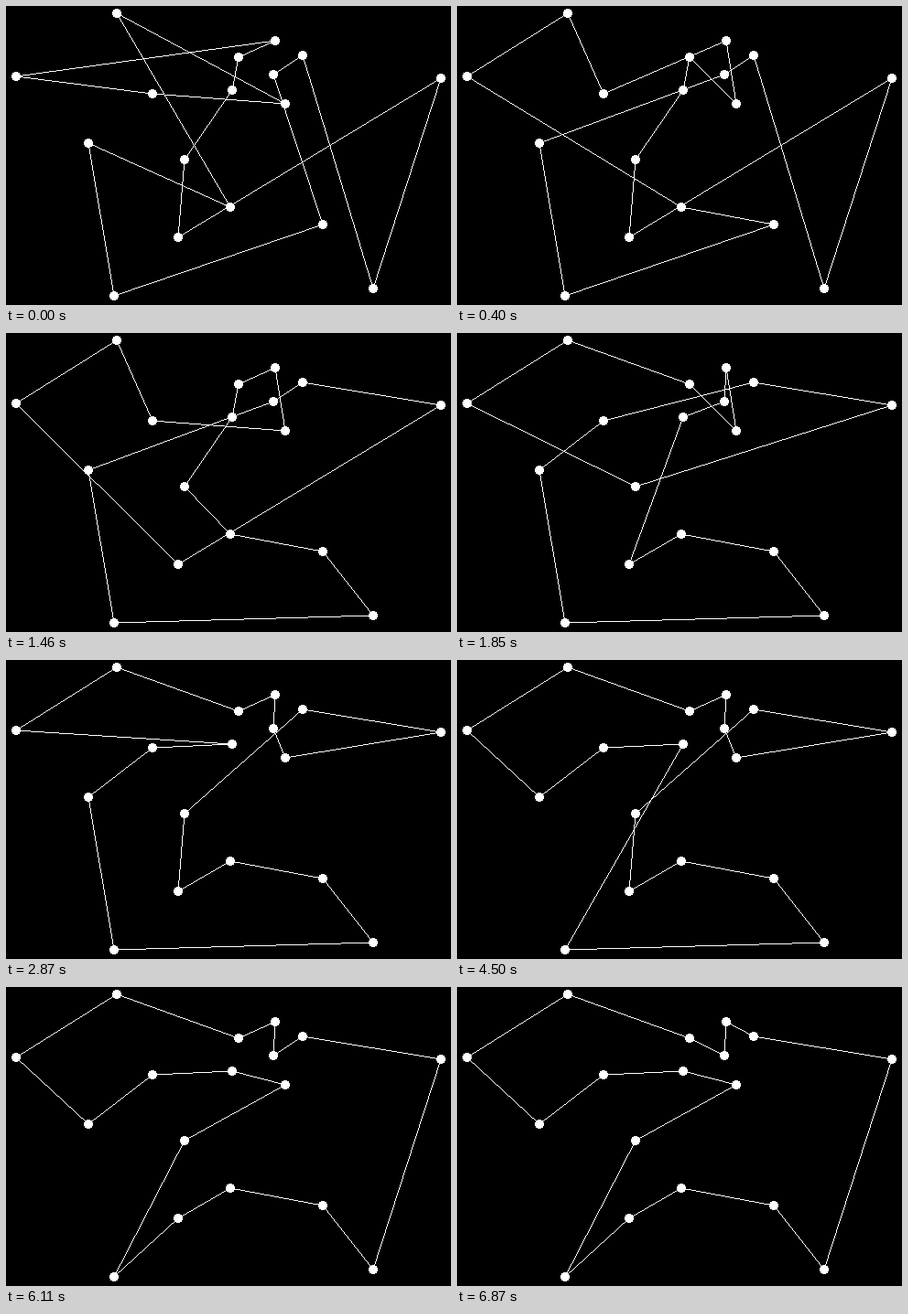
A matplotlib script that plays this animation: 486x327 px, repeating every 8 s.

```python
import matplotlib.pyplot as plt
import numpy as np
from matplotlib.animation import FuncAnimation

W, H, DPI = 486, 327, 64
LOOP, STEP = 8000, 20
DOT_RADIUS = 5

CITIES = {
    "A": (121, 8), "B": (11, 77), "C": (160, 96), "D": (254, 56),
    "E": (294, 38), "F": (324, 54), "G": (292, 75), "H": (305, 107),
    "I": (247, 92), "J": (475, 79), "K": (90, 150), "L": (195, 168),
    "M": (245, 220), "N": (188, 253), "O": (346, 239), "P": (118, 317),
    "Q": (401, 309),
}
START = "ILNJQFGOPKMAHCBED"

# "XY" swaps two cities, "X-Y" reverses the stretch between them.
MOVES = [
    (130, "HE KO"), (260, "EB"), (400, "AB"), (770, "F-P"), (1050, "JO"),
    (1190, "EH"), (1460, "MN"), (1720, "CG"), (1850, "GD LN"),
    (2380, "LI"), (2500, "HE"), (2750, "F-G G-I"), (2870, "HG"),
    (4500, "KI"), (5020, "FH"), (5160, "LP"), (5460, "HL"),
    (6110, "H-J"), (6870, "GE"),
]


def mutate(tour, move):
    i, j = sorted((tour.index(move[0]), tour.index(move[-1])))
    cities = list(tour)
    if "-" in move:
        cities[i:j + 1] = cities[i:j + 1][::-1]
    else:
        cities[i], cities[j] = cities[j], cities[i]
    return "".join(cities)


def draw_dots():
    # Coordinates name pixel corners, so pixel centres lie half a step on.
    yy, xx = np.mgrid[:H, :W] + 0.5
    layer = np.zeros((H, W))
    for x, y in CITIES.values():
        layer[np.hypot(xx - x, yy - y) < DOT_RADIUS] = 1
    return layer


def draw_line(layer, start, end):
    """Draw a crisp line, sampled at pixel centres along its longer axis."""
    (x0, y0), (x1, y1) = start, end
    count = max(abs(x1 - x0), abs(y1 - y0))
    t = (np.arange(count) + 0.5) / count
    xs = np.floor(x0 + t * (x1 - x0)).astype(int)
    ys = np.floor(y0 + t * (y1 - y0)).astype(int)
    layer[ys, xs] = 1


def draw_tour(tour, dots):
    layer = dots.copy()
    for a, b in zip(tour, tour[1:] + tour[0]):
        draw_line(layer, CITIES[a], CITIES[b])
    return layer


def build_stages():
    dots = draw_dots()
    tour = START
    times, pictures = [0], [draw_tour(tour, dots)]
    for time, moves in MOVES:
        for move in moves.split():
            tour = mutate(tour, move)
        times.append(time)
        pictures.append(draw_tour(tour, dots))
    return times, pictures


times, pictures = build_stages()

fig = plt.figure(figsize=(W / DPI, H / DPI), dpi=DPI, facecolor="black")
ax = fig.add_axes([0, 0, 1, 1])
ax.axis("off")
image = ax.imshow(pictures[0], cmap="gray", vmin=0, vmax=1,
                  interpolation="nearest", aspect="auto")


def update(frame):
    now = frame * STEP + STEP / 2
    stage = np.searchsorted(times, now, side="right") - 1
    image.set_data(pictures[stage])
    return [image]


animation = FuncAnimation(fig, update, frames=LOOP // STEP, interval=STEP,
                          repeat=True, repeat_delay=0)
plt.show()
```
